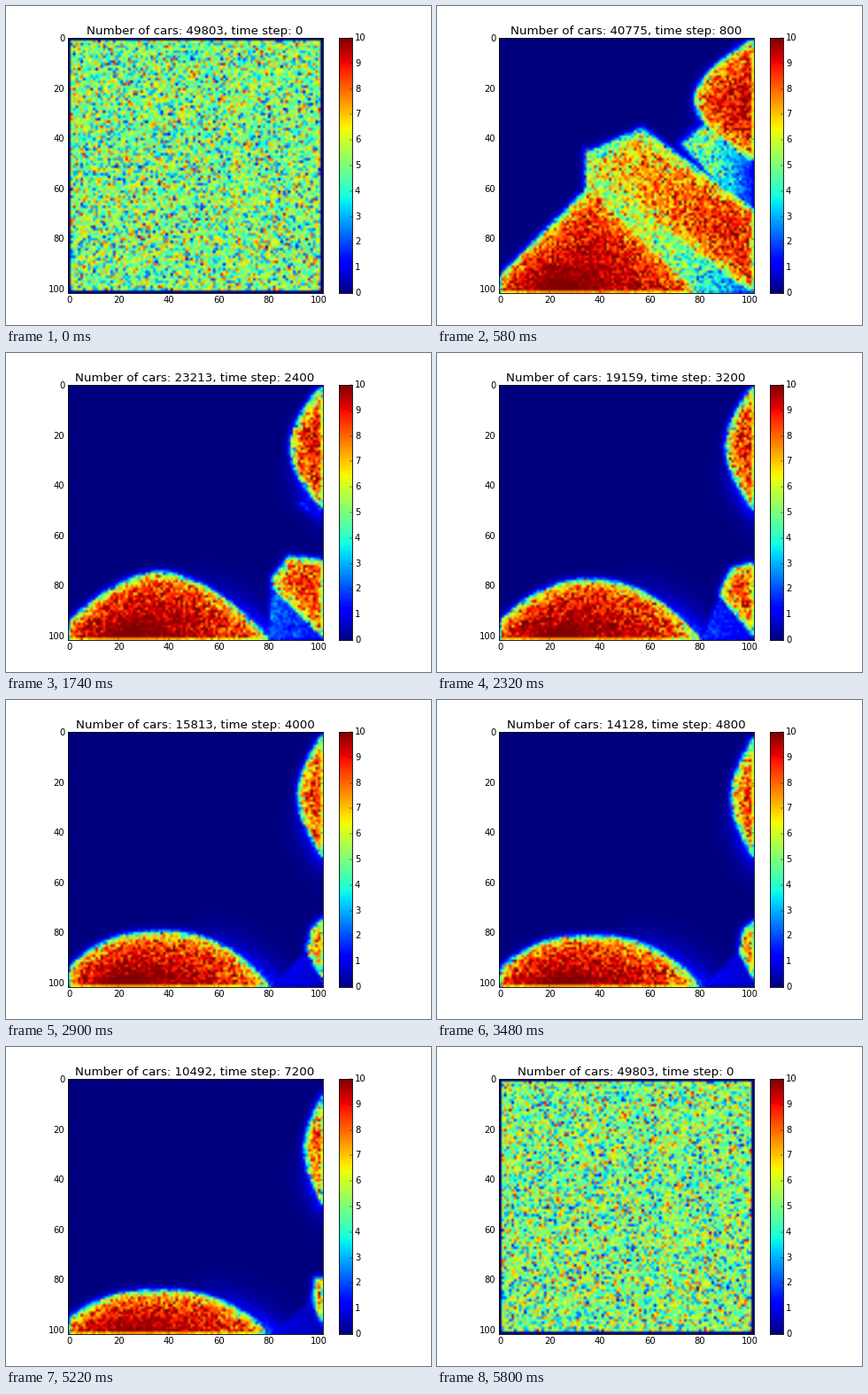
A matplotlib script for the animation above (8 s loop, 480 px wide and 360 px high).

```python
import numpy as np
import matplotlib.pyplot as plt
from matplotlib.animation import FuncAnimation

plt.style.use("classic")
plt.rcParams.update({
    "font.family": "DejaVu Sans",
    "figure.facecolor": "white",
    "savefig.facecolor": "white",
    "savefig.dpi": 60,
})

N = 102                # grid cells per side, including the border
CAPACITY = 10
LOOP, TICK, HOLD = 8000, 40, 290
STEP, STATES = 400, 20

Y, X = np.mgrid[0:N, 0:N].astype(float)


def ramp(v, lo, hi):
    return np.clip((v - lo) / (hi - lo), 0, 1)


def car_count(step):
    """Cars left on the grid, decaying exponentially between known counts."""
    steps = [0, 800, 2400, 4000, 5600, 7200, 8800]
    cars = [49803, 40775, 23213, 15813, 12622, 10492, 8720]
    return round(float(np.exp(np.interp(step, steps, np.log(cars)))))


def depth(points):
    """Signed distance to a polygon's edge, positive inside."""
    poly = np.vstack(points)
    near = np.full(X.shape, 1e9)
    inside = np.zeros(X.shape, bool)
    for (px, py), (qx, qy) in zip(poly, np.roll(poly, -1, axis=0)):
        dx, dy = qx - px, qy - py
        t = np.clip(((X - px) * dx + (Y - py) * dy)
                    / (dx * dx + dy * dy + 1e-9), 0, 1)
        near = np.minimum(near, np.hypot(X - px - t * dx, Y - py - t * dy))
        if dy:
            inside ^= ((py > Y) != (qy > Y)) & (X < px + (Y - py) * dx / dy)
    return np.where(inside, near, -near)


def jam(d):
    core = 4.4 + 3.9 * (1 - np.exp(-np.maximum(d, 0) / 2))
    core += np.clip(0.06 * d, 0, 1)
    return core * np.exp(np.minimum(d, 0) / 0.9)


def halo(d, size, reach):
    return size * np.exp(np.minimum(d, 0) / reach)


def east_jam(step):
    """Lens on the right wall that thins out and shortens from the top."""
    top = max(0, (step - 3300) / 560)
    u = np.linspace(0, 1, 25)
    x = 101 - 23 * (step / 800) ** -0.57 * np.sin(np.pi * u)
    edge = np.column_stack([x, top + (49 - top) * u])
    return depth([(130, -30), edge, (130, 80)])


def south_jam(step):
    """Heap on the bottom wall: a triangle that sinks and rounds off."""
    x = np.linspace(0, 80, 33)
    slope = np.interp(x, [0, 36, 80], [0.15, 1, 0])
    power = np.clip(1 + (step - 800) / 2100, 1, 2.5)
    height = 42 * (step / 800) ** -0.42 * (1 - (1 - slope) ** power)
    return depth([(-30, 130), np.column_stack([x, 101 - height]), (90, 130)])


def field(k):
    rng = np.random.default_rng(k + 7)
    if k == 0:
        cells = rng.binomial(CAPACITY, 0.498, (N, N)).astype(float)
        cells[[0, -1]] = 0
        cells[:, [0, -1]] = 0
        return cells

    step = k * STEP
    east, south = east_jam(step), south_jam(step)

    # The middle jam is a diagonal band whose tip retreats to the right wall.
    reach = np.interp(step, [400, 800, 2400, 4000, 7200],
                      [88, 66, 19.5, 5.5, 3.5])
    wall = 70 + 9 * ramp(step, 3200, 7200)
    tip_top = (101 - reach, 90 - 0.68 * reach)
    tip_low = (101 - reach, 90 - 0.48 * reach)
    middle = depth([(104, wall), (101 - 0.67 * reach, 82 - 0.7 * reach),
                    tip_top, tip_low, (104, 103)])

    # Thin traffic flows between the jams to the gaps in the walls.
    f = reach / 66
    flow = min(1, f) ** 0.5
    upper = depth([(101 - 19 * f, 49 - 14 * f), (104, 47),
                   (104, 49 + 26 * f), (101 - 27 * f, 49 - 7 * f)])
    lower = depth([tip_top, tip_low, (80, 103), (104, 103)])

    packed = np.exp(-((X - 22) / 25) ** 2) * ramp(Y, 80, 98)
    mean = np.maximum.reduce([
        jam(east),
        jam(south) * (1 + 0.08 * packed),
        jam(middle) * (1 - 0.28 * ramp(-X, -95, -40)),
        halo(upper, flow * (4.8 - 3.3 * ramp(X, 84, 101)), 1.5),
        halo(lower, flow * (5.8 - 3.4 * ramp(X, 60, 100)), 1),
        halo(south, 2.5, 4) * ramp(X, 45, 85),
        halo(east, 2, 3) * ramp(Y, 25, 45),
    ])
    mean = np.clip(mean, 0, CAPACITY)
    spread = 0.27 * np.sqrt(mean * (CAPACITY - mean)) * ramp(mean, 0, 5)
    cells = mean + spread * rng.normal(size=mean.shape)
    cells[-1] *= 0.75
    cells[:, -1] *= 0.75
    cells[:, 0] *= 0.5
    cells[0] *= 0.4
    return np.clip(cells, 0, CAPACITY)


fields = [field(k) for k in range(STATES)]

fig = plt.figure(figsize=(8, 6), dpi=60)
ax = fig.add_axes([0.145, 0.1, 0.6, 0.8])
image = ax.imshow(fields[0], cmap="jet", vmin=0, vmax=CAPACITY, aspect="auto",
                  interpolation="bilinear", interpolation_stage="rgba")
ax.set_xlim(-0.5, N - 0.5)
ax.set_ylim(N - 0.5, -0.5)
ax.set_xticks(range(0, 101, 20))
ax.set_yticks(range(0, 101, 20))
title = ax.set_title("", fontsize=16)

bar = fig.add_axes([0.78375, 0.1, 0.03, 0.8])
bar.imshow(np.linspace(0, CAPACITY, 256)[:, None], cmap="jet", aspect="auto",
           origin="lower", extent=(0, 1, 0, CAPACITY), interpolation="nearest")
bar.set_xticks([])
bar.yaxis.tick_right()
bar.set_yticks(range(CAPACITY + 1))


def update(i):
    # After the last state the start returns and stays until the loop ends.
    k = min((i * TICK + TICK - 1) // HOLD, STATES) % STATES
    image.set_data(fields[k])
    title.set_text(f"Number of cars: {car_count(k * STEP)}, "
                   f"time step: {k * STEP}")
    return image, title


anim = FuncAnimation(fig, update, frames=LOOP // TICK, interval=TICK,
                     repeat=True, repeat_delay=0)
plt.show()
```
